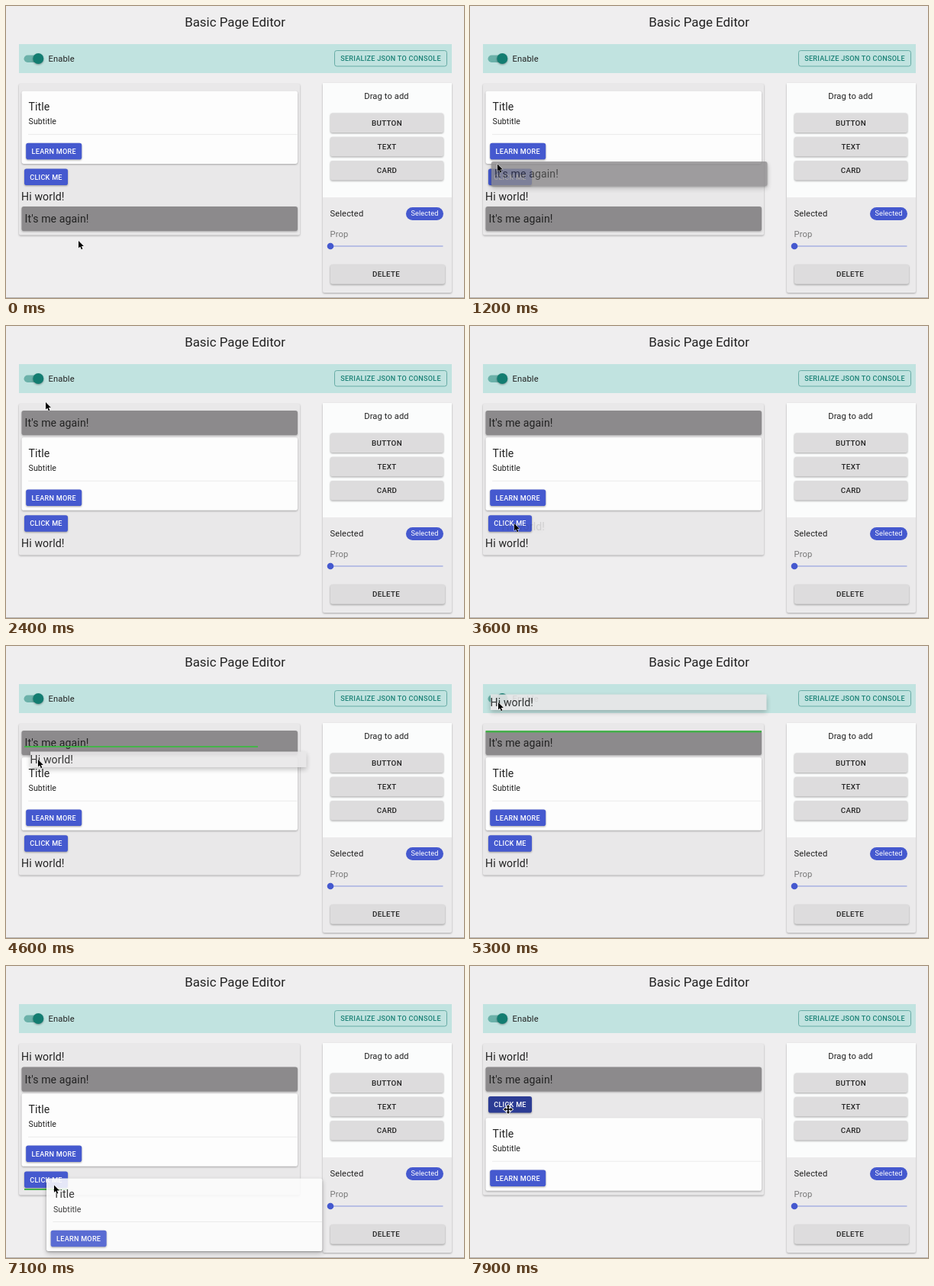
An HTML page for the animation above (8 s loop, 600 by 383 pixels).

```html
<!DOCTYPE html>
<html lang="en">
<head>
<meta charset="utf-8">
<title>Basic Page Editor</title>
<style>
html, body { margin: 0; width: 100%; height: 100%; overflow: hidden; background: #efeeef; }
svg { display: block; width: 600px; height: 383px; }
text { font-family: Roboto, Arial, sans-serif; font-size: 11.2px; letter-spacing: .009em; fill: #222; }
.h6 { font-size: 14.1px; letter-spacing: .0075em; }
.btn { font-weight: 500; letter-spacing: .0286em; text-anchor: middle; }
.small { font-size: 9.1px; }
.medium { font-size: 9.8px; }
.raised { filter: drop-shadow(0 1px 1px rgba(0,0,0,.35)); }
.paper { filter: drop-shadow(0 1px .8px rgba(0,0,0,.3)); }
#ghost { filter: drop-shadow(0 3px 3px rgba(0,0,0,.25)); }
</style>
</head>
<body>
<svg id="stage" viewBox="0 0 600 383"></svg>
<script>
const BLUE = '#4559cf', DARK_BLUE = '#2c3c94', WIDTH = 361.5, LEFT = 20.5;

const rect = (x, y, w, h, fill, extra = '') =>
  `<rect x="${x}" y="${y}" width="${w}" height="${h}" fill="${fill}" ${extra}/>`;
const text = (x, y, label, extra = '') => `<text x="${x}" y="${y}" ${extra}>${label}</text>`;
const button = (x, y, w, h, label, size, fill, color, id = '') =>
  rect(x, y, w, h, fill, `rx="2.8" class="raised" ${id && `id="${id}"`}`) +
  text(x + w / 2, y + h / 2 + 3.4, label, `class="btn ${size}" style="fill:${color}"`);
const tool = (y, label, w = 148) => button(425, y, w, 25.5, label, 'medium', '#dddcdd', '#222');

const blocks = {
  card: rect(0, 0, WIDTH, 95.5, '#fdfdfd', 'rx="2.8" class="paper"') +
    text(9, 25.7, 'Title', 'class="h6"') +
    text(9, 44, 'Subtitle', 'style="font-size:10.6px"') +
    rect(8.5, 56.5, WIDTH - 9, 1, '#ebebeb') +
    button(5.7, 68.3, 73, 21.5, 'LEARN MORE', 'small', BLUE, '#fff'),
  bar: rect(0, 0, WIDTH, 32, '#8c8a8c', 'rx="2.8" class="paper"') +
    text(4, 21, "It's me again!", 'class="h6"'),
  click: button(3.5, 0, 57, 21.5, 'CLICK ME', 'small', BLUE, '#fff', 'clickFace'),
  words: text(-.4, 15, 'Hi world!', 'class="h6"')
};
const names = Object.keys(blocks);

const $ = id => document.getElementById(id);
$('stage').innerHTML = `
<defs>${names.map(n => `<g id="${n}">${blocks[n]}</g>`).join('')}</defs>
${rect(0, 0, 600, 383, '#efeeef')}
${text(300, 27, 'Basic Page Editor', 'text-anchor="middle" style="font-size:16.9px;letter-spacing:0"')}
${rect(17, 50, 567, 38, '#c1e3e0')}
${rect(23.5, 64.5, 24, 9.5, '#6bb1a9', 'rx="4.75"')}
<circle cx="42.3" cy="69" r="7" fill="#137d71" class="raised"/>
${text(55.5, 73, 'Enable')}
${rect(430.5, 58.5, 147, 20.5, 'none', 'rx="2.8" stroke="#67aca5"')}
${text(504, 72, 'SERIALIZE JSON TO CONSOLE', 'class="btn small" style="fill:#1b8276"')}
${rect(17, 102, 368, 198.5, '#e9e8e9', 'rx="2" class="paper"')}
${rect(415, 101, 169, 275, '#ebeaeb', 'rx="2" class="paper"')}
${rect(415, 101, 169, 150, '#fbfcfc')}
${text(498.5, 121.5, 'Drag to add', 'text-anchor="middle"')}
${tool(140.5, 'BUTTON')}${tool(171.7, 'TEXT')}${tool(203, 'CARD')}
${text(424.5, 276, 'Selected')}
${rect(524, 264, 49, 17, BLUE, 'rx="8.5"')}
${text(548.5, 275.4, 'Selected', 'text-anchor="middle" style="font-size:9.2px;fill:#fff"')}
${text(424.5, 303, 'Prop', 'style="fill:#777"')}
${rect(425, 314.3, 147.5, 1.4, '#a3aee2')}
<circle cx="425" cy="315" r="4.3" fill="${BLUE}"/>
${tool(339.3, 'DELETE', 150).replace('x="500"', 'x="498"')}
${rect(0, 382, 600, 1, '#b5b4b5')}
${names.map(n => `<use id="${n}Place" href="#${n}"/>`).join('')}
<rect id="marker"/>
<g id="ghost">${rect(0, 0, WIDTH, 20.5, '#e8e7e8', 'id="ghostBack"')}<use id="ghostBlock"/></g>
<path id="arrow" d="M0 0V9.6L2.2 7.6 3.8 11.2 5.4 10.5 3.8 7H6.9Z" fill="#000" stroke="#fff" stroke-width=".9" paint-order="stroke"/>
<path id="move" d="M0-6L2.3-3.2H.8V-.8H3.2V-2.3L6 0 3.2 2.3V.8H.8V3.2H2.3L0 6-2.3 3.2H-.8V.8H-3.2V2.3L-6 0-3.2-2.3V-.8H-.8V-3.2H-2.3Z" fill="#000" stroke="#fff" stroke-width="1.6" paint-order="stroke"/>`;

// Top edge of each block, from the given time on.
const layouts = [
  { from: 0, card: 111.4, click: 213.5, words: 240, bar: 263 },
  { from: 2100, bar: 111, card: 146.2, click: 248.2, words: 275 },
  { from: 5600, words: 109, bar: 132.5, card: 167.2, click: 269.5 },
  { from: 7300, words: 109, bar: 132.5, click: 171, card: 199.2 }
];
// Block held by the pointer and its offset from the tip.
const drags = [
  { from: 800, to: 2100, block: 'bar', dx: -8, dy: -3.5, opacity: .8 },
  { from: 3500, to: 5600, block: 'words', dx: -10, dy: -10.5, opacity: .9 },
  { from: 6200, to: 7300, block: 'card', dx: -10, dy: -9, opacity: .87 }
];
// Drop markers: from, to, x, y, width, height, colour.
const GREEN = '#45b04b', RED = '#f8352a';
const markers = [
  [1300, 1500, LEFT, 208, WIDTH, 2, GREEN],
  [1500, 2100, LEFT, 111, WIDTH, 2, GREEN],
  [4400, 4800, 24, 131.2, 306, 1.8, '#3fb944'],
  [4800, 5600, LEFT, 111, WIDTH, 2.5, GREEN],
  [6300, 6900, 39, 185.5, 20, 10, RED],
  [6900, 7300, 24, 292, 57, 2, GREEN]
];
// Pointer path: time, x, y.
const path = [
  [0, 95, 308], [200, 90, 306], [700, 28.5, 267], [900, 28.5, 266], [1700, 52, 81],
  [2100, 50, 88], [2400, 52, 100], [3200, 31, 286], [3400, 31, 285], [3600, 58, 259],
  [4600, 42, 149], [5300, 37, 74], [5600, 37, 78], [6050, 31, 176], [6200, 31, 177],
  [6600, 117, 280], [7000, 64, 287], [7300, 60, 289], [7500, 58, 270], [7900, 50, 188]
];

function pointerAt(t) {
  const i = path.findIndex(p => p[0] > t);
  if (i < 0) return path.at(-1).slice(1);
  const [a, b] = [path[i - 1], path[i]];
  const u = (t - a[0]) / (b[0] - a[0]), k = u * u * (3 - 2 * u);
  return [a[1] + (b[1] - a[1]) * k, a[2] + (b[2] - a[2]) * k];
}

const set = (id, attrs) => {
  for (const key in attrs) $(id).setAttribute(key, attrs[key]);
};
const at = (x, y) => `translate(${x} ${y})`;
const show = on => on ? 'inline' : 'none';

function draw(t) {
  const [x, y] = pointerAt(t);
  const layout = layouts.filter(l => l.from <= t).at(-1);
  names.forEach(n => set(n + 'Place', { transform: at(LEFT, layout[n]) }));

  const drag = drags.find(d => t >= d.from && t < d.to);
  set('ghost', { display: show(drag) });
  if (drag) {
    const starting = drag.block === 'words' && t < 3700;
    set('ghost', {
      transform: starting ? at(x - 16, y - 6) : at(x + drag.dx, y + drag.dy),
      opacity: starting ? .12 : drag.opacity
    });
    set('ghostBlock', { href: '#' + drag.block });
    set('ghostBack', { display: show(drag.block === 'words' && !starting) });
  }

  const marker = markers.find(m => t >= m[0] && t < m[1]);
  set('marker', { display: show(marker) });
  if (marker) {
    const [, , mx, my, width, height, fill] = marker;
    set('marker', { x: mx, y: my, width, height, fill });
  }

  const inside = !drag && x > LEFT && x < LEFT + WIDTH && y > 109 && y < 298;
  const hover = inside && x > 24 && x < 81 && y > layout.click && y < layout.click + 21.5;
  set('clickFace', { fill: hover ? DARK_BLUE : BLUE });
  set('arrow', { transform: at(x, y), display: show(!inside) });
  set('move', { transform: at(x, y), display: show(inside) });
}

const start = performance.now();
function tick() {
  const t = (performance.now() - start) % 8000;
  draw(Math.floor(t / 100) * 100);
  requestAnimationFrame(tick);
}
tick();
</script>
</body>
</html>
```
